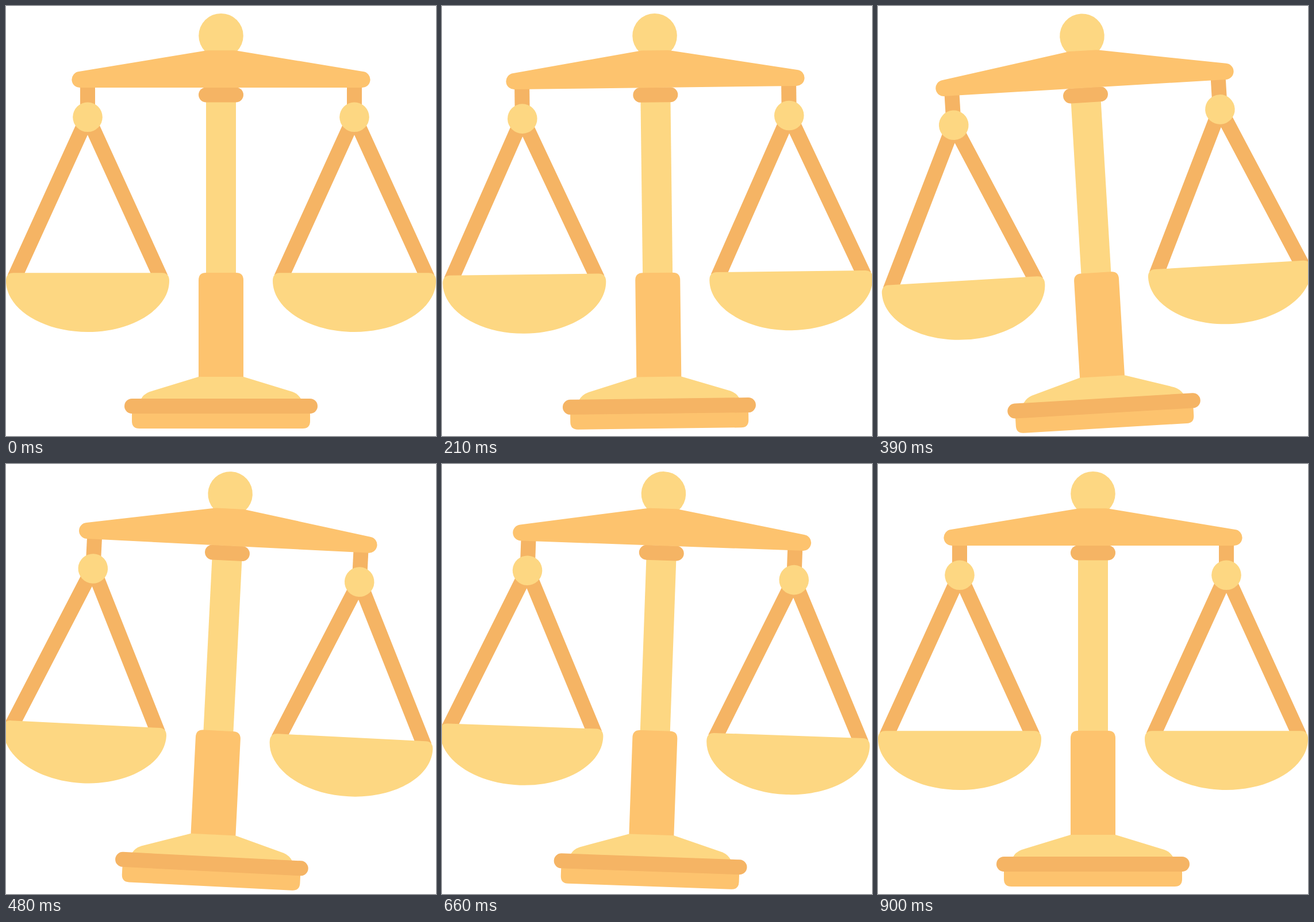
Recreate the animation shown at these times as an HTML page. Size 748 by 748 pixels, loop 930 ms.

```html
<!DOCTYPE html>
<html lang="en">
<head>
<meta charset="utf-8">
<title>Swinging scales</title>
<style>
  html, body { margin: 0; width: 100%; height: 100%; overflow: hidden; background: #fff; }
  svg { display: block; width: 100vw; height: 100vh; }
  .light { fill: #fdd782; }
  .mid { fill: #fdc36e; }
  .dark { fill: #f5b464; }
  .cord { fill: none; stroke: #f5b464; stroke-width: 25.9; }
</style>
</head>
<body>
<svg viewBox="0 0 748 748">
  <defs>
    <g id="pan">
      <rect class="dark" x="129" y="140" width="26" height="45"/>
      <path class="cord" d="M142 193L14.5 473M142 193L269.5 473"/>
      <path class="light" d="M13 464.3H271Q284 464.3 284 478C284 527 220 567 142 567S0 527 0 478Q0 464.3 13 464.3Z"/>
      <circle class="light" cx="142" cy="193.3" r="25.8"/>
    </g>
  </defs>
  <g id="scales">
    <circle class="light" cx="374" cy="51.7" r="38.8"/>
    <use href="#pan"/>
    <use href="#pan" x="464"/>
    <rect class="light" x="348" y="160" width="52" height="310"/>
    <rect class="dark" x="335" y="141.5" width="78" height="26" rx="13"/>
    <path class="mid" d="M345 78Q349 77.3 352 77.3H396Q399 77.3 403 78L621 114A14 14 0 0 1 618 142H130A14 14 0 0 1 127 114Z"/>
    <path class="mid" d="M335 646V477Q335 464 348 464H400Q413 464 413 477V646Z"/>
    <path class="light" d="M335 645H413L498 671Q509 675 514 685H234Q239 675 250 671Z"/>
    <path class="mid" d="M219 705H529V722Q529 735 516 735H232Q219 735 219 722Z"/>
    <rect class="dark" x="206" y="683" width="336" height="26" rx="13"/>
  </g>
</svg>
<script>
  const STEP = 30, LOOP = 930, SPAN = 900;
  const scales = document.getElementById("scales");

  // [progress, degrees]
  const swing = [
    [0, 0], [0.2, -30], [0.3, 30], [0.4, -30], [0.5, 24.5], [0.6, -19.8],
    [0.7, 16], [0.8, -12.6], [0.9, 9], [1, 0]
  ];

  // cubic-bezier(0, 0, 0.58, 1)
  function easeOut(x) {
    let lo = 0, hi = 1;
    for (let i = 0; i < 24; i++) {
      const s = (lo + hi) / 2;
      if (1.74 * s * s - 0.74 * s ** 3 < x) lo = s; else hi = s;
    }
    return 3 * lo * lo - 2 * lo ** 3;
  }

  function angleAt(p) {
    if (p <= 0 || p >= 1) return 0;
    const i = swing.findIndex(key => key[0] > p + 1e-9);
    const [p0, a0] = swing[i - 1], [p1, a1] = swing[i];
    const x = Math.max(0, (p - p0) / (p1 - p0));
    return a0 + (a1 - a0) * easeOut(x);
  }

  function draw(ms) {
    const t = Math.floor((ms % LOOP) / STEP + 1e-6) * STEP;
    scales.setAttribute("transform", `rotate(${angleAt(t / SPAN).toFixed(3)} 374 374)`);
  }

  const start = performance.now();
  function tick() {
    draw(performance.now() - start);
    requestAnimationFrame(tick);
  }
  tick();
</script>
</body>
</html>
```
